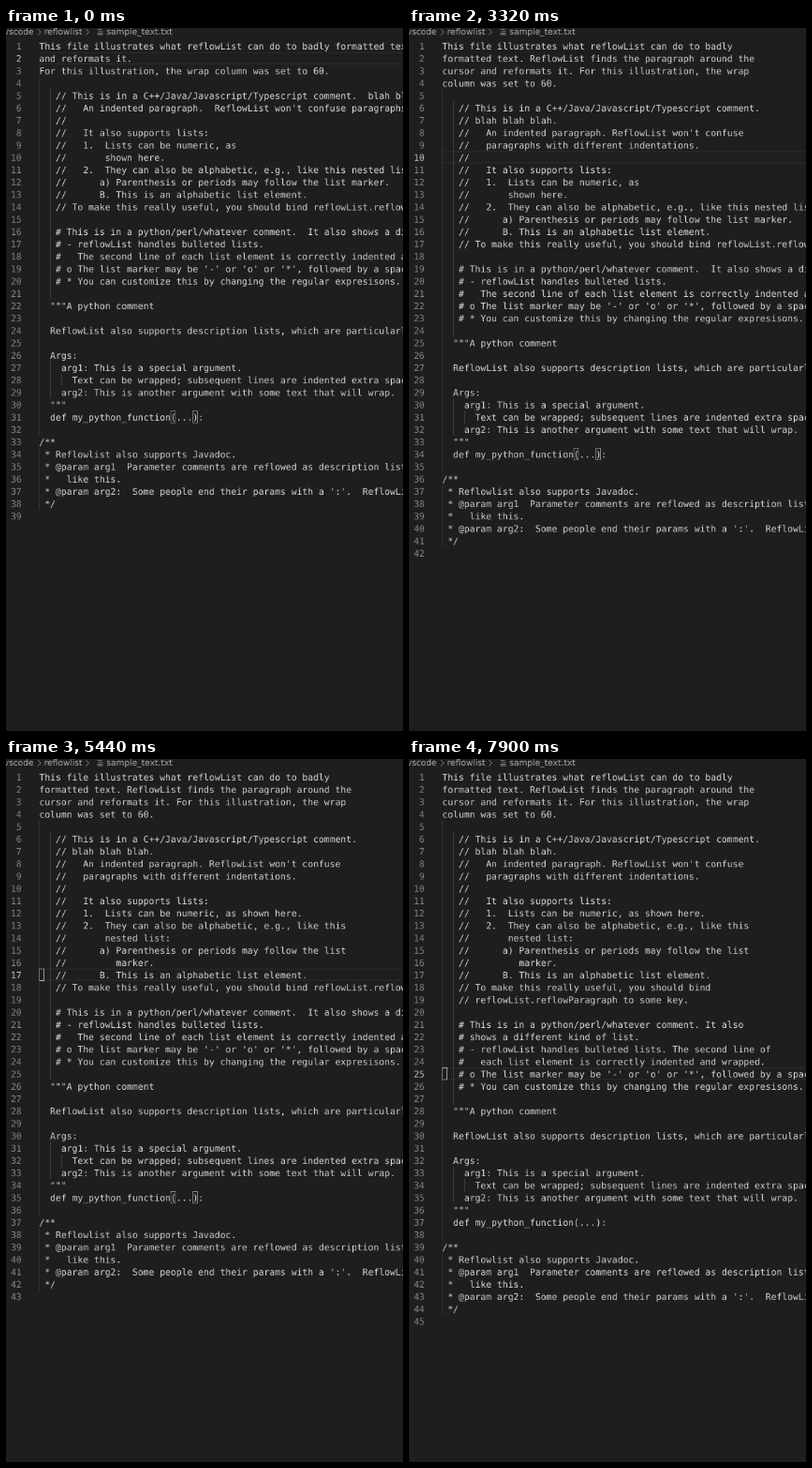
These frames come from a looping animation (424x750 px, 8000 ms). An HTML page with a canvas:

```html
<!DOCTYPE html>
<html lang="en">
<head>
<meta charset="utf-8">
<title>Paragraph reflow</title>
<style>
  html, body { margin: 0; width: 100%; height: 100%; overflow: hidden; background: #1e1e1e; }
  canvas { display: block; width: 424px; height: 750px; }
</style>
</head>
<body>
<canvas width="424" height="750"></canvas>
<script>
// The editor is drawn at its natural size, then scaled down to the stage.
const WIDTH = 611, HEIGHT = 1080, SCALE = 750 / HEIGHT;
const LOOP = 8000, LEFT = 51, TOP = 18, CHAR = 8.43, ROW = 19, TAB = 2;

const text = `This file illustrates what reflowList can do to badly formatted text.  ReflowList finds the paragraph around the cursor
and reformats it.
For this illustration, the wrap column was set to 60.

   // This is in a C++/Java/Javascript/Typescript comment.  blah blah blah.
   //   An indented paragraph.  ReflowList won't confuse paragraphs with different indentations.
   //
   //   It also supports lists:
   //   1.  Lists can be numeric, as
   //       shown here.
   //   2.  They can also be alphabetic, e.g., like this nested list:
   //      a) Parenthesis or periods may follow the list marker.
   //      B. This is an alphabetic list element.
   // To make this really useful, you should bind reflowList.reflowParagraph to some key.

   # This is in a python/perl/whatever comment.  It also shows a different kind of list.
   # - reflowList handles bulleted lists.
   #   The second line of each list element is correctly indented and wrapped.
   # o The list marker may be '-' or 'o' or '*', followed by a space.
   # * You can customize this by changing the regular expresisons.

  """A python comment

  ReflowList also supports description lists, which are particularly useful.

  Args:
    arg1: This is a special argument.
      Text can be wrapped; subsequent lines are indented extra spaces.
    arg2: This is another argument with some text that will wrap.
  """
  def my_python_function(...):

/**
 * Reflowlist also supports Javadoc.
 * @param arg1  Parameter comments are reflowed as description lists,
 *   like this.
 * @param arg2:  Some people end their params with a ':'.  ReflowList allows it.
 */
`;

// Each step: time, cursor line, cursor visible, then an optional edit
// (number of lines replaced, first line, new text).
const steps = [
  [0, 2, 0], [250, 2, 1], [750, 2, 0],
  [1050, 5, 1, 3, 1, `This file illustrates what reflowList can do to badly
formatted text. ReflowList finds the paragraph around the
cursor and reformats it. For this illustration, the wrap
column was set to 60.`],
  [1490, 5, 0], [1670, 6, 1], [2150, 6, 0],
  [2310, 8, 1, 1, 6, `   // This is in a C++/Java/Javascript/Typescript comment.
   // blah blah blah.`],
  [2770, 8, 0],
  [2860, 10, 1, 1, 8, `   //   An indented paragraph. ReflowList won't confuse
   //   paragraphs with different indentations.`],
  [3320, 10, 0], [3470, 11, 1], [3850, 12, 1], [4330, 12, 0],
  [4460, 13, 1, 2, 12, `   //   1.  Lists can be numeric, as shown here.`],
  [4950, 15, 1, 1, 13, `   //   2.  They can also be alphabetic, e.g., like this
   //       nested list:`],
  [5390, 15, 0],
  [5440, 17, 1, 1, 15, `   //      a) Parenthesis or periods may follow the list
   //         marker.`],
  [5920, 18, 1],
  [6400, 20, 1, 1, 18, `   // To make this really useful, you should bind
   // reflowList.reflowParagraph to some key.`],
  [6850, 21, 1],
  [7350, 23, 1, 1, 21, `   # This is in a python/perl/whatever comment. It also
   # shows a different kind of list.`],
  [7810, 23, 0],
  [7900, 25, 1, 2, 23, `   # - reflowList handles bulleted lists. The second line of
   #   each list element is correctly indented and wrapped.`]
];
const BRACKETS_END = 5480;

const stage = document.querySelector("canvas").getContext("2d");
stage.imageSmoothingQuality = "low";
const page = document.createElement("canvas");
page.width = WIDTH;
page.height = HEIGHT;
const ctx = page.getContext("2d");
ctx.textRendering = "geometricPrecision";

const colX = col => Math.round(LEFT + col * CHAR);
const rowY = row => TOP + row * ROW;

function rect(x, y, w, h, fill) {
  ctx.fillStyle = fill;
  ctx.fillRect(x, y, w, h);
}

function write(str, x, y, fill, align = "left") {
  ctx.fillStyle = fill;
  ctx.textAlign = align;
  ctx.fillText(str, x, y);
}

function outline(col, row, stroke) {
  ctx.strokeStyle = stroke;
  ctx.strokeRect(colX(col) + .5, rowY(row) + .5, 7, ROW - 1);
}

function drawCrumbs() {
  const grey = "#a9a9a9";
  ctx.font = '13px "DejaVu Sans", sans-serif';
  write("vscode", -3.3, 10, grey);
  write("reflowlist", 58.5, 10, grey);
  write("sample_text.txt", 154.5, 10, grey);
  ctx.strokeStyle = grey;
  ctx.stroke(new Path2D("M49 1.7l4.4 4.5l-4.4 4.5M123 1.7l4.4 4.5l-4.4 4.5"));
  ctx.stroke(new Path2D("M140.5 2.5h7M142 5h7M140.5 7.5h8.5M140.5 10h8.5"));
}

// Number of indent guides per line; blank lines borrow from their neighbours.
function guideLevels(lines) {
  const indents = lines.map(line => line.search(/\S/));
  return indents.map((indent, i) => {
    if (indent >= 0) return Math.ceil(indent / TAB);
    const above = indents.slice(0, i).findLast(n => n >= 0);
    const below = indents.slice(i).find(n => n >= 0);
    if (above === undefined || below === undefined) return 0;
    return above === below ? Math.ceil(below / TAB) : 1 + Math.floor(Math.min(above, below) / TAB);
  });
}

function draw(lines, cursor, visible, brackets) {
  const levels = guideLevels(lines);
  rect(0, 0, WIDTH, HEIGHT, "#1e1e1e");
  drawCrumbs();

  rect(LEFT, rowY(cursor), WIDTH, 2, "#282828");
  rect(LEFT, rowY(cursor) + ROW - 2, WIDTH, 2, "#282828");

  ctx.font = '14px "DejaVu Sans Mono", monospace';
  lines.forEach((line, i) => {
    const y = rowY(i);
    for (let n = 0; n < levels[i]; n++) rect(colX(n * TAB), y, 1, ROW, "#404040");
    write(i + 1, 24, y + 15, i === cursor ? "#c6c6c6" : "#858585", "right");
    write(line, LEFT, y + 15, "#d4d4d4");
    if (brackets && line.includes("(...)"))
      for (const mark of "()") outline(line.indexOf(mark), i, "#888");
  });
  if (visible) outline(cursor === 1 ? lines[1].length : 0, cursor, "#aeafad");

  stage.drawImage(page, 0, 0, WIDTH * SCALE, HEIGHT * SCALE);
}

let shown = "";
function tick() {
  const t = performance.now() % LOOP;
  const past = steps.filter(step => step[0] <= t);
  const brackets = t < BRACKETS_END;
  const key = past.length + "," + brackets;
  if (key !== shown) {
    shown = key;
    const lines = text.split("\n");
    for (const [, , , count, line, edit] of past)
      if (edit) lines.splice(line - 1, count, ...edit.split("\n"));
    const [, cursor, visible] = past.at(-1);
    draw(lines, cursor - 1, visible, brackets);
  }
  requestAnimationFrame(tick);
}
tick();
</script>
</body>
</html>
```
